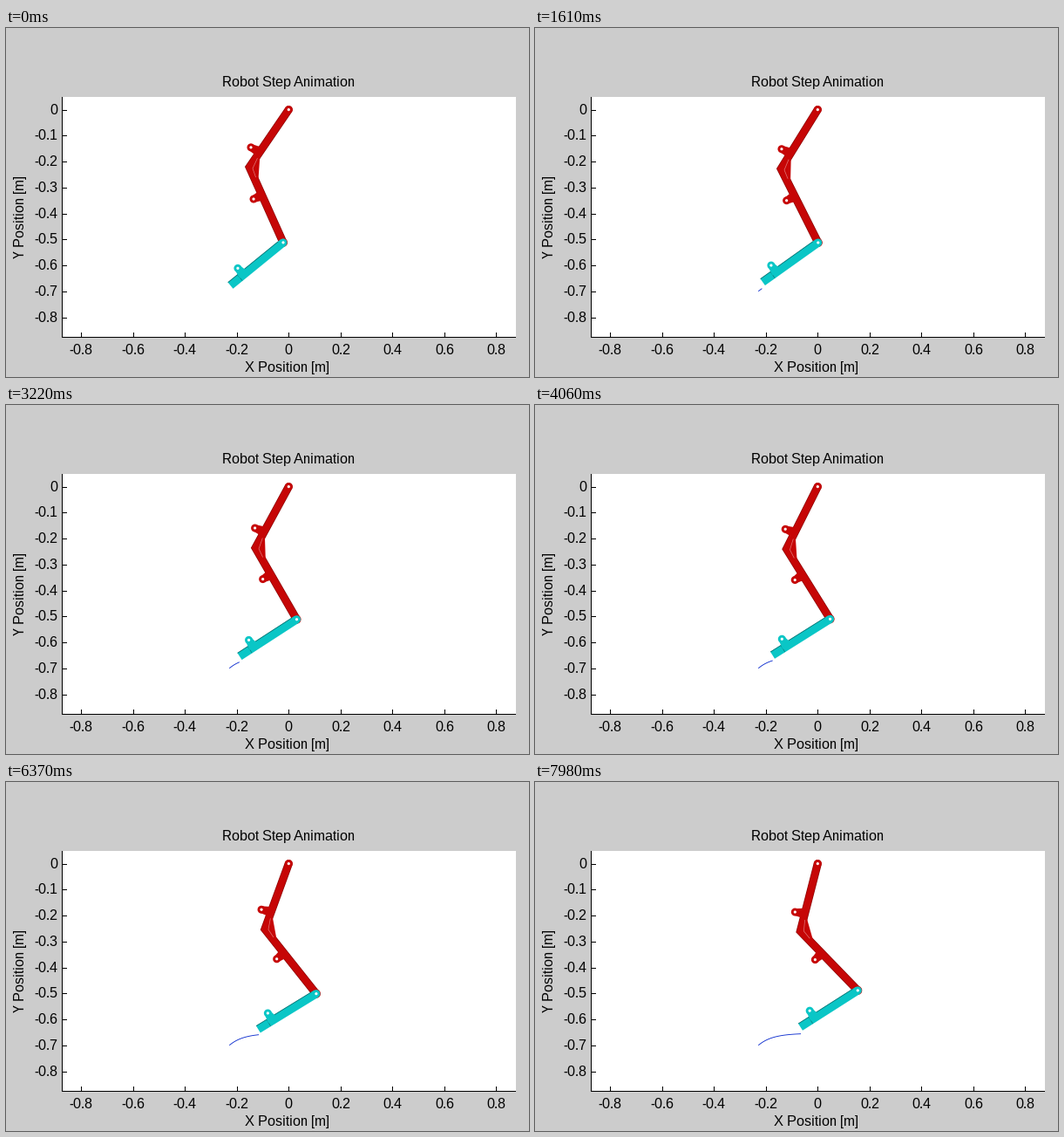
A matplotlib script for the animation above (8 s loop, 600 px wide and 400 px high).

```python
import math

import matplotlib.pyplot as plt
import numpy as np
from matplotlib.animation import FuncAnimation
from matplotlib.lines import Line2D
from matplotlib.patches import Circle, Polygon, Rectangle
from matplotlib.transforms import Affine2D

W, H, DPI = 600, 400, 100
PX = 72 / DPI                    # points per pixel
FRAMES, INTERVAL = 80, 100
SECONDS = 7.98

LEFT, TOP, RIGHT, BOTTOM = 64, 79, 585, 354
ORIGIN = np.array([324.5, 94])   # plot position (0, 0)
STEP = 29.75                     # pixels per 0.1 m
TICK = 5

HIP = np.array([324.3, 93.6])
LEG = 152.4                      # hip to ankle
FOOT = 78
RED, DARK_RED, PALE_RED = "#c60606", "#8a0000", "#e27878"
CYAN, DARK_CYAN = "#0ac6c6", "#0a7070"

plt.rcParams.update({"font.family": "Liberation Sans",
                     "text.hinting": "native", "text.hinting_factor": 1})
fig = plt.figure(figsize=(W / DPI, H / DPI), dpi=DPI, facecolor="#cccccc")
ax = fig.add_axes([0, 0, 1, 1])
ax.set_xlim(0, W)
ax.set_ylim(H, 0)
ax.axis("off")


# ---- plot frame -----------------------------------------------------------
def label(x, y, text, ha="center", **kw):
    ax.text(x, y, text, fontsize=16 * PX, ha=ha, va="baseline", **kw)


def box(x, y, w, h, color="black"):
    ax.add_patch(Rectangle((x, y), w, h, color=color, lw=0,
                           antialiased=False))


box(LEFT, TOP, RIGHT - LEFT, BOTTOM - TOP, "white")
box(LEFT, TOP, 1, BOTTOM - TOP)
box(LEFT, BOTTOM, RIGHT - LEFT, 1)
for k in range(-8, 9, 2):
    x = math.floor(ORIGIN[0] + k * STEP)
    box(x, BOTTOM - TICK, 1, TICK)
    label(x, 374, f"{k / 10:.1f}" if k else "0")
for k in range(9):
    y = math.floor(ORIGIN[1] + k * STEP)
    box(LEFT + 1, y, TICK, 1)
    label(59.5, y + 5, f"{-k / 10:.1f}" if k else "0", ha="right")
label(323.5, 67, "Robot Step Animation")
label(322.5, 394, "X Position [m]")
label(21.5, 216.5, "Y Position [m]", rotation=90, rotation_mode="anchor")


# ---- rigid parts ----------------------------------------------------------
class Part:
    """A group of shapes that moves as one body about its own origin."""

    def __init__(self, color, z):
        self.color, self.z, self.shapes = color, z, []

    def add(self, shape):
        self.z += 0.01
        shape.set_zorder(self.z)
        self.shapes.append(shape)
        ax.add_artist(shape)

    def poly(self, *pts):
        self.add(Polygon(pts, facecolor=self.color, lw=0))

    def line(self, width, color, *pts, cap="butt"):
        self.add(Line2D(*zip(*pts), lw=width * PX, color=color,
                        solid_joinstyle="miter", solid_capstyle=cap))

    def ring(self, center, radius=4.5, hole=1.6):
        self.add(Circle(center, radius, facecolor=self.color, lw=0))
        self.add(Circle(center, hole, facecolor="white", lw=0))

    def lug(self, center, base):
        """A ring on a tapered neck that widens towards the bar."""
        a, b = np.array(center), np.array(base)
        side = np.array([a[1] - b[1], b[0] - a[0]]) / math.dist(a, b)
        self.poly(a + 4 * side, b + 6 * side, b - 6 * side, a - 4 * side)
        self.ring(center)

    def place(self, angle, pos):
        move = Affine2D().rotate(angle).translate(*pos) + ax.transData
        for shape in self.shapes:
            shape.set_transform(move)


# Thigh and shank, drawn with the ankle straight below the hip.
hip, knee, ankle = (0, 0), (-42.3, 67.7), (0, LEG)
leg = Part(RED, 4)
leg.line(9.2, DARK_RED, hip, knee, ankle, cap="round")
leg.line(7.8, RED, hip, knee, ankle, cap="round")
leg.poly((-30.5, 46), (-31.5, 82), knee)
leg.line(0.7, PALE_RED, (-33.5, 57), (-38.5, 69), (-34.5, 79))
leg.lug((-41.5, 45), (-31, 50))
leg.lug((-36, 104), (-27, 99.5))
leg.ring(hip)
leg.ring(ankle, 5)

# Foot, with x running from the ankle to the toe.
foot = Part(CYAN, 6)
foot.line(9.4, CYAN, (0, 0), (FOOT, 0))
foot.line(0.8, DARK_CYAN, (4, 4.5), (FOOT, 4.5))
foot.line(0.6, DARK_CYAN, (64, -4.5), (64, 4.5))
foot.lug((59, 10), (58.5, 0))
foot.ring((0, 0))

trace = Line2D([], [], color="#1030d0", lw=0.9 * PX, zorder=3)
ax.add_line(trace)


# ---- motion ---------------------------------------------------------------
def ankle_x(t):
    return 318 + 3.6 * t + 0.37 * t ** 2


def foot_tilt(t):
    return math.radians(31.4 + 0.23 * (t - 5.8) ** 2)


def toe_path(t):
    """The toe speeds up to the right while its rise levels off."""
    run = 48 * (t / SECONDS) ** 1.65
    return 256.6 + run, 288 + 13.5 * np.exp(-run / 16)


def draw(i):
    t = SECONDS * i / (FRAMES - 1)
    swing = math.asin((ankle_x(t) - HIP[0]) / LEG)
    leg.place(-swing, HIP)
    foot.place(math.pi - foot_tilt(t),
               HIP + LEG * np.array([math.sin(swing), math.cos(swing)]))
    trace.set_data(*toe_path(np.linspace(0, t, i + 1)))
    return leg.shapes + foot.shapes + [trace]


anim = FuncAnimation(fig, draw, frames=FRAMES, interval=INTERVAL,
                     repeat=True, repeat_delay=0)
plt.show()
```
